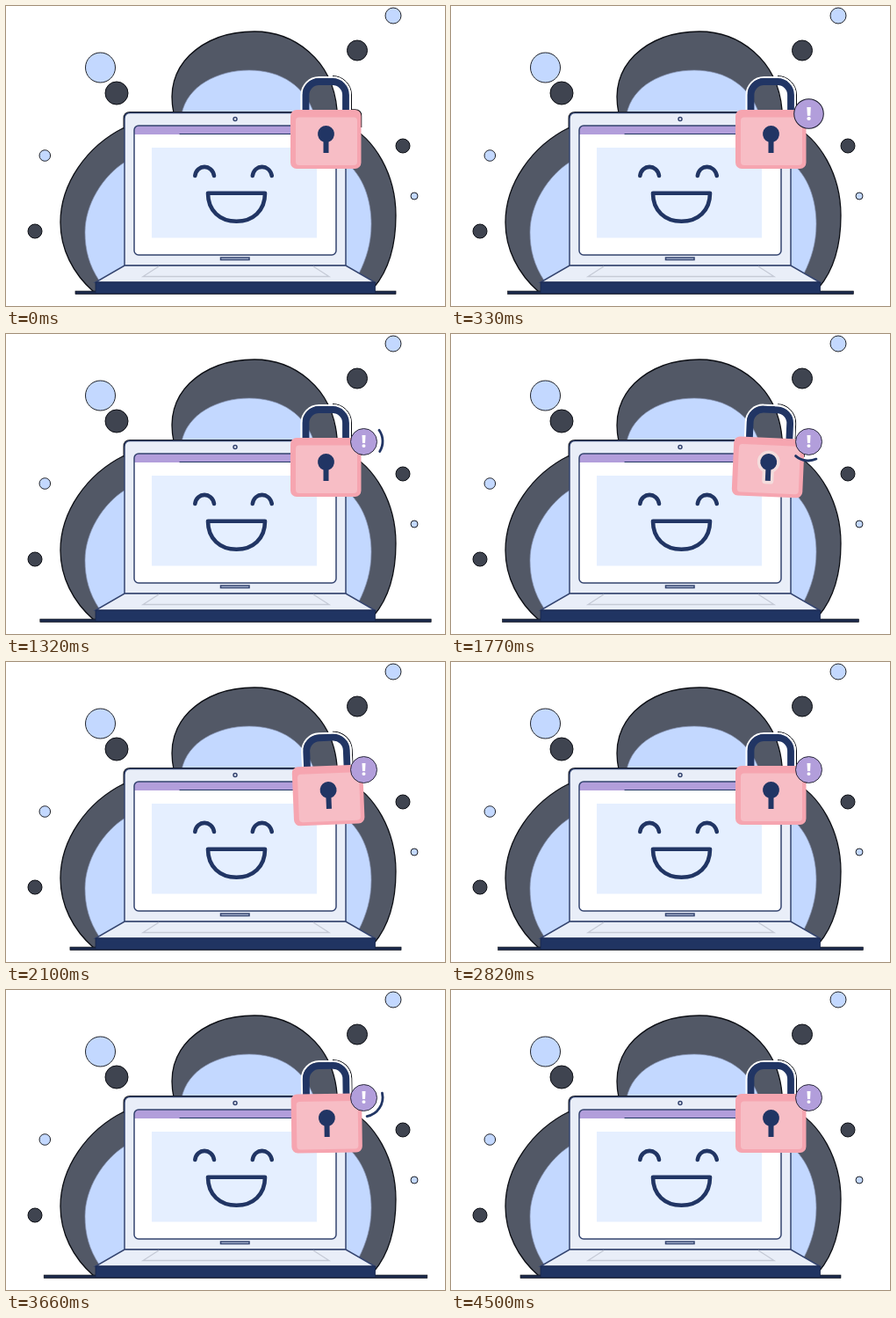
Recreate the animation shown at these times as an HTML page. Size 500 by 341 pixels, loop 4.53 s.

```html
<!DOCTYPE html>
<html lang="en">
<head>
<meta charset="utf-8">
<title>Locked laptop</title>
<style>
  html, body { margin: 0; width: 100%; height: 100%; overflow: hidden; background: #fff; }
  svg { display: block; width: 100%; height: 100%; }
  text { font: 800 19px "Open Sans", sans-serif; }
  .line { fill: none; stroke: #213564; stroke-linecap: round; stroke-linejoin: round; }
  .lid { fill: #e9eef8; stroke: #34446f; stroke-width: 1.5; }
</style>
</head>
<body>
<svg viewBox="0 0 500 341">
  <g stroke="#0c0e14">
    <g fill="#c3d8ff" stroke-width=".9">
      <circle cx="107.500" cy="70" r="17"/>
      <circle cx="44.300" cy="170" r="6.300"/>
      <circle cx="441" cy="11" r="9"/>
      <circle cx="465" cy="216" r="4"/>
    </g>
    <g fill="#3f4450">
      <circle cx="126" cy="99" r="13"/>
      <circle cx="33" cy="256" r="8"/>
      <circle cx="400" cy="50.500" r="11.500"/>
      <circle cx="452" cy="159" r="8"/>
    </g>
    <path fill="#525866" stroke-width="1.300" d="M100 325C76 304 62 276 62 246C62 202 92 159 135 138L191 122C186 98 190 75 209 56C229 37 256 29 283 29C327 29 372 60 377 118L386 134C421 150 444 193 444 238C444 272 436 300 419 320Z"/>
  </g>
  <g fill="#c3d8ff" stroke="#8794b5" stroke-width=".7">
    <path d="M106 312C95 295 90 278 90 257C90 226 110 193 136 177V300Z"/>
    <path d="M200 123C206 91 241 73 277 73C314 73 341 92 351 123Z"/>
    <path d="M386 177C407 192 416 221 416 248C416 270 410 288 402 304L386 296Z"/>
  </g>

  <rect id="ground" y="324" height="3.600" fill="#1d2a4b" stroke="#0c0e14" stroke-width=".6"/>

  <path fill="none" stroke="#0c0e14" stroke-width="2" d="M134.500 140V128Q134.500 121 141.500 121H380"/>
  <path class="lid" d="M135 295V128Q135 121.500 141.500 121.500H380Q387 121.500 387 128V295Z"/>
  <rect x="146" y="136" width="230" height="147" rx="5" fill="#fff"/>
  <path fill="#b29edb" d="M146 146V140Q146 136 150 136H372Q376 136 376 140V146Z"/>
  <path class="line" stroke-width="1.200" d="M198 145.500H375"/>
  <rect x="146" y="136" width="230" height="147" rx="5" fill="none" stroke="#34446f" stroke-width="1.500"/>
  <rect x="166" y="161" width="188" height="102.500" fill="#e5efff"/>
  <circle class="lid" cx="261" cy="128.500" r="2"/>
  <rect class="lid" x="244.500" y="286" width="32.500" height="2.500" style="fill:#c3cfe8"/>
  <path class="lid" d="M135 295H387L420 314H102Z"/>
  <path d="M174 296L156 307.500H368L350 296" fill="none" stroke="#c5cad6" stroke-width="1.300"/>
  <path fill="#203462" stroke="#17254b" stroke-width=".8" d="M102 314H420.500V326.500H102Z"/>
  <g class="line" stroke-width="4.600">
    <path d="M215.300 193C217 179.500 235 179.500 237 193M280.800 193C283 179.500 300 179.500 302.800 193"/>
    <path d="M230 212.800H295C295 233 281 244.800 262.500 244.800C244 244.800 230 233 230 212.800Z"/>
  </g>

  <g id="lock">
    <g fill="none">
      <path stroke="#0c0e14" d="M372 79.500A21.500 21.500 0 0 1 393.500 101V118"/>
      <path stroke="#fff" stroke-width="2" d="M336.500 118V101A20 20 0 0 1 356.500 81H372A20 20 0 0 1 392 101V118"/>
      <path stroke="#213564" stroke-width="7.800" d="M341.500 120V101A15 15 0 0 1 356.500 86H372A15 15 0 0 1 387 101V120"/>
      <path stroke="#0c0e14" stroke-width="1.500" d="M394 118H397.500Q404.500 118 404.500 125V138"/>
    </g>
    <rect x="324" y="118" width="80.500" height="67" rx="7" fill="#f6a5b0"/>
    <rect x="330" y="126.500" width="70" height="54.500" rx="4" fill="#f7bdc5"/>
    <path id="halo" fill="#213564" stroke="#f4dddd" stroke-linejoin="round" paint-order="stroke" d="M364.500 136A9.500 9.500 0 0 1 367.500 154.500V167H361.500V154.500A9.500 9.500 0 0 1 364.500 136Z"/>
  </g>

  <path id="sweep" class="line" stroke-width="2.800"/>
  <g id="badge">
    <circle r="15" fill="#b29edb" stroke="#1a1b2b" stroke-width=".9"/>
    <text y="6.800" text-anchor="middle" fill="#fff">!</text>
  </g>
</svg>
<script>
const LOOP = 4530, CYCLE = 2240;
const $ = id => document.getElementById(id);
const smooth = u => u * u * (3 - 2 * u);

// Piecewise interpolation through [time, value] pairs.
function track(t, keys, ease = u => u) {
  const i = keys.findIndex(k => k[0] > t);
  if (i < 0) return keys[keys.length - 1][1];
  if (i === 0) return keys[0][1];
  const [a, from] = keys[i - 1], [b, to] = keys[i];
  return from + (to - from) * ease((t - a) / (b - a));
}

function point(deg) {
  const a = deg * Math.PI / 180;
  return `${407 + 22 * Math.cos(a)} ${122 + 22 * Math.sin(a)}`;
}

function draw(t) {
  const p = t < CYCLE ? t : Math.min(t - CYCLE, CYCLE);

  const half = track(p, [[0, 182.5], [CYCLE / 2, 231.5], [CYCLE, 182.5]]);
  $('ground').setAttribute('x', 261.5 - half);
  $('ground').setAttribute('width', half * 2);

  const tilt = track(p, [[1360, 0], [1520, -2.5], [1770, 2.5], [2080, -2.5], [2220, 0]], smooth);
  $('lock').setAttribute('transform', `rotate(${tilt} 365 82)`);
  $('halo').setAttribute('stroke-width', track(p, [[1450, 0], [1770, 7], [2060, 0]], smooth));

  const head = track(p, [[1170, -40], [1530, 131]]);
  const tail = track(p, [[1300, -40], [2060, 131]]);
  $('sweep').setAttribute('d', head - tail > 1 ? `M${point(tail)}A22 22 0 0 1 ${point(head)}` : '');

  const pop = track(t, [[30, 0], [330, 1.12], [480, 1]], smooth);
  $('badge').setAttribute('transform', `translate(407.5 122.5) scale(${pop})`);
}

function frame() {
  draw(performance.now() % LOOP);
  requestAnimationFrame(frame);
}
frame();
</script>
</body>
</html>
```
